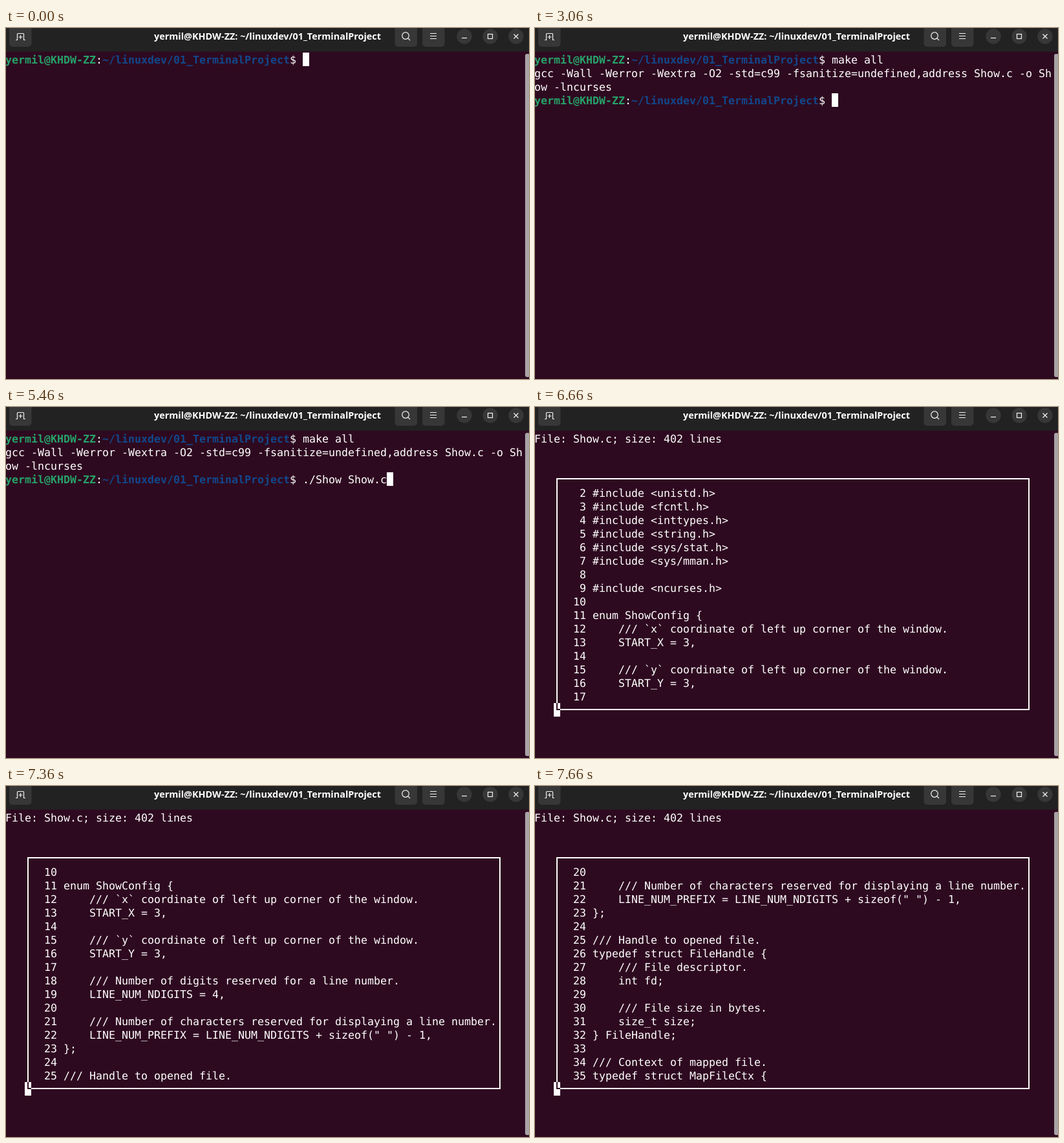
An HTML page that plays this animation: 809 px wide and 543 px high, repeating every 8 s.

```html
<!DOCTYPE html>
<html lang="en">
<head>
<meta charset="utf-8">
<title>Terminal</title>
<style>
  html, body { margin: 0; width: 100%; height: 100%; overflow: hidden; background: #2e0a20; }
  svg { display: block; }
  text { white-space: pre; fill: #fff; }
  #rows { font: 16.61px "DejaVu Sans Mono", monospace; text-rendering: geometricPrecision; }
  .title { font: 600 14.4px "Noto Sans", sans-serif; text-anchor: middle; }
  .user { fill: #26a269; font-weight: bold; }
  .path { fill: #12488b; font-weight: bold; }
  .button { fill: #373737; }
  .icon { fill: none; stroke: #f4f4f4; stroke-width: 1.2; }
</style>
</head>
<body>
<svg width="809" height="543" viewBox="0 0 809 543">
  <rect width="809" height="543" fill="#2e0a20"/>
  <rect width="809" height="36.5" fill="#222"/>
  <g class="button">
    <rect x="5" y="-8" width="34.5" height="37" rx="5"/>
    <rect x="601.5" y="-8" width="34.5" height="37" rx="5"/>
    <rect x="644" y="-8" width="34.5" height="37" rx="5"/>
    <circle cx="709" cy="13" r="11.7"/>
    <circle cx="749" cy="13" r="11.7"/>
    <circle cx="789" cy="13" r="11.7"/>
  </g>
  <g class="icon">
    <path d="M15 18.5H17.5V9.5Q17.5 8.5 18.5 8.5H26.5Q27.5 8.5 27.5 9.5V18.5H30M22.5 11V17M19.5 14H25.5"/>
    <circle cx="618" cy="12" r="5.3"/>
    <path d="M621.8 15.8L625 19"/>
    <path d="M656 8.5H666M656 12.5H666M656 16.5H666"/>
    <path d="M705 15.5H713"/>
    <rect x="745.5" y="9.5" width="7" height="7"/>
    <path d="M785.5 9.5L792.5 16.5M792.5 9.5L785.5 16.5"/>
  </g>
  <text class="title" x="404.5" y="18">yermil@KHDW-ZZ: ~/linuxdev/01_TerminalProject</text>
  <rect x="803" y="40" width="7" height="500" rx="3" fill="#a8a3a5"/>
  <g id="rows"></g>
  <rect id="frame" x="34" y="111" width="730" height="357" fill="none" stroke="#fff" stroke-width="2"/>
  <g id="cursor">
    <rect width="10" height="21" fill="#fff"/>
    <path id="corner" d="M5 0V10H10" fill="none" stroke="#2e0a20" stroke-width="2"/>
  </g>
</svg>
<script>
const LOOP = 8000;
const CODE = `#include <stdio.h>
#include <unistd.h>
#include <fcntl.h>
#include <inttypes.h>
#include <string.h>
#include <sys/stat.h>
#include <sys/mman.h>

#include <ncurses.h>

enum ShowConfig {
    /// \`x\` coordinate of left up corner of the window.
    START_X = 3,

    /// \`y\` coordinate of left up corner of the window.
    START_Y = 3,

    /// Number of digits reserved for a line number.
    LINE_NUM_NDIGITS = 4,

    /// Number of characters reserved for displaying a line number.
    LINE_NUM_PREFIX = LINE_NUM_NDIGITS + sizeof(" ") - 1,
};

/// Handle to opened file.
typedef struct FileHandle {
    /// File descriptor.
    int fd;

    /// File size in bytes.
    size_t size;
} FileHandle;

/// Context of mapped file.
typedef struct MapFileCtx {`.split("\n");

const BUILD = [
  "gcc -Wall -Werror -Wextra -O2 -std=c99 -fsanitize=undefined,address Show.c -o Sh",
  "ow -lncurses"
];
const PROMPT = '<tspan class="user">yermil@KHDW-ZZ</tspan>:' +
  '<tspan class="path">~/linuxdev/01_TerminalProject</tspan>$ ';
const PROMPT_COLS = 46;
const KEYS = [1290, 1360, 1560, 1660, 1760, 1860, 2030, 2160];
const HISTORY = [[3060, ""], [3760, "make all"], [3960, "clear"], [4260, "./Show Show.c"]];
const BLINKS = [[3390, 3730], [4860, 5460], [6230, 6630]];

const byId = id => document.getElementById(id);
const escapeText = s => s.replace(/&/g, "&amp;").replace(/</g, "&lt;");

function shell(t) {
  const typed = "make all".slice(0, KEYS.filter(k => t >= k).length);
  const rows = [PROMPT + typed];
  if (t < 2760) return { rows, col: PROMPT_COLS + typed.length, row: 0 };
  if (t < 2790) return { rows, col: 0, row: 1 };
  rows.push(...BUILD);
  if (t < 2830) return { rows, col: BUILD[1].length, row: 2 };
  if (t < 3060) return { rows, col: 0, row: 3 };
  const command = HISTORY.filter(h => t >= h[0]).pop()[1];
  rows.push(PROMPT + command);
  if (t >= 5630) return { rows, col: 0, row: 4 };
  return { rows, col: PROMPT_COLS + command.length, row: 3 };
}

// Key repeat sampled at 30 fps; the repeat gains one line on the sampling.
function firstLine(t) {
  if (t < 6660) return 1;
  if (t < 7130) return 2;
  const d = Math.min(t - 7130, 530);
  const step = 3 * Math.floor(d / 100) + Math.min(2, Math.floor(d % 100 / 30));
  return 3 + step + (step > 11 ? 1 : 0);
}

function viewer(t) {
  const first = firstLine(t);
  const rows = ["File: Show.c; size: 402 lines", "", "", ""];
  for (let n = first; n < first + 16; n++) {
    rows.push("    " + String(n).padStart(4) + " " + escapeText(CODE[n - 1]));
  }
  return { rows, col: 3, row: 20 };
}

let shown = "";
function draw() {
  const t = performance.now() % LOOP;
  const viewing = t >= 5660;
  const { rows, col, row } = viewing ? viewer(t) : shell(t);
  const html = rows.map((s, i) => s && `<text x="-1" y="${55 + 21 * i}">${s}</text>`).join("");
  if (html !== shown) byId("rows").innerHTML = shown = html;

  const hidden = BLINKS.some(([off, on]) => t >= off && t < on);
  byId("cursor").setAttribute("transform", `translate(${10 * col - 1} ${38 + 21 * row})`);
  byId("cursor").style.display = hidden ? "none" : "";
  byId("corner").style.display = byId("frame").style.display = viewing ? "" : "none";
  requestAnimationFrame(draw);
}
draw();
</script>
</body>
</html>
```
